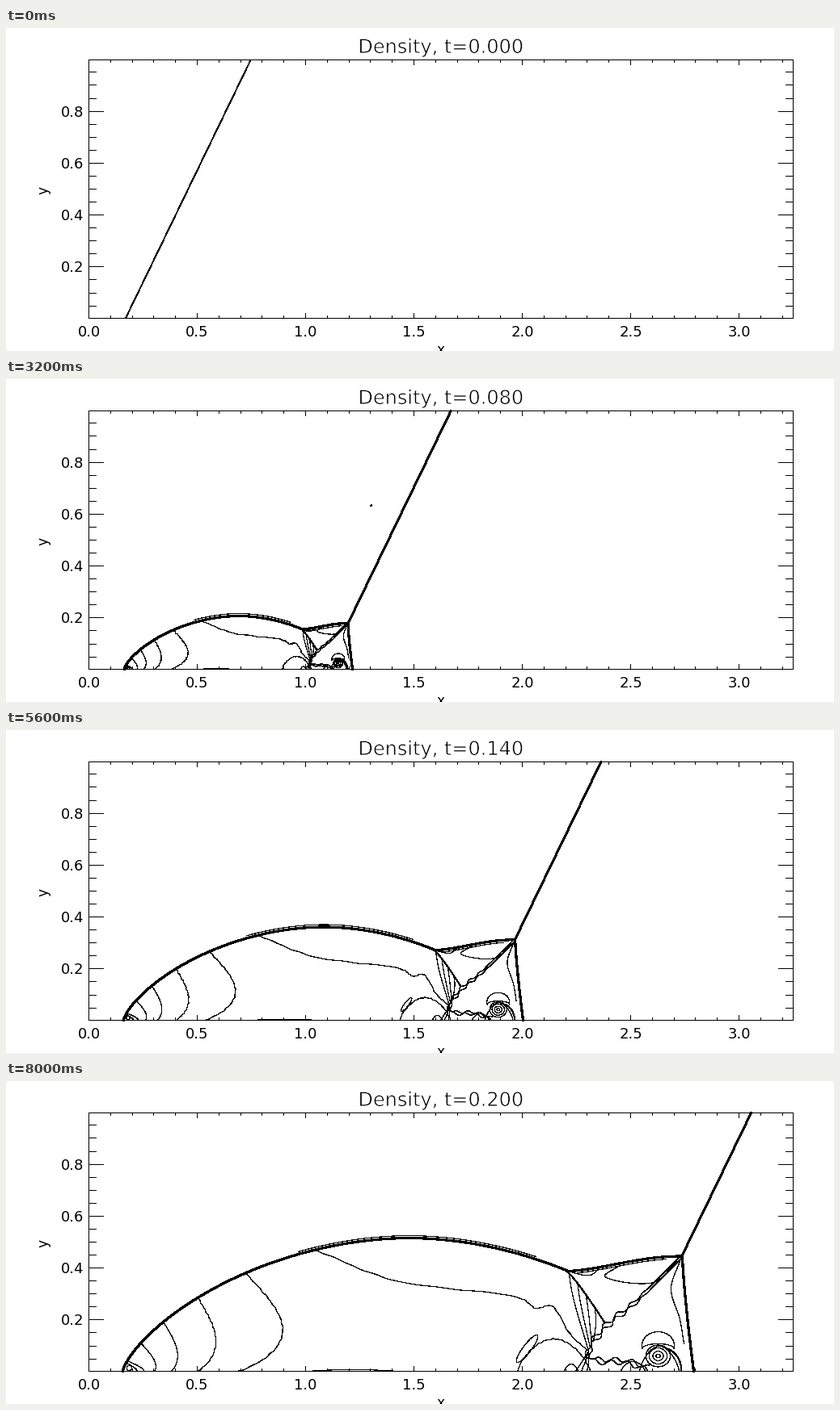
Write a matplotlib script that moves like this. It is 1024 by 400 pixels and loops after 8.4 s.

```python
import numpy as np
import matplotlib.pyplot as plt
import matplotlib.patheffects as effects
from matplotlib.animation import FuncAnimation

plt.rcParams["path.simplify"] = False
plt.rcParams["font.family"] = "DejaVu Sans"
W, H, DPI = 1024, 400, 100
PX = 72 / DPI                       # points per pixel
LEFT, RIGHT, TOP, WALL = 102, 973, 39, 359
UNIT = 268                          # pixels per unit of x
CELL = 1 / 240                      # the y axis runs between cell centres
FOOT = np.array([146.7, WALL])      # the flow grows from this point
NODE = np.array([720, 334])         # where the inner contours meet
STEPS = 21
GAP = [[np.nan, np.nan]]
V = np.linspace(0, 1, 90)

fig = plt.figure(figsize=(W / DPI, H / DPI), dpi=DPI, facecolor="white")
ax = fig.add_axes([0, 0, 1, 1])
ax.set_xlim(-0.5, W - 0.5)
ax.set_ylim(H - 0.5, -0.5)
ax.axis("off")


def pen(width):
    line, = ax.plot([], [], color="black", lw=width * PX, antialiased=False,
                    solid_capstyle="round", solid_joinstyle="round",
                    snap=False)
    return line


def draw(line, paths):
    parts = [part for path in paths for part in (path, GAP)]
    line.set_data(*np.vstack(parts or [GAP]).T)


def label(x, y, text, size=18, **kw):
    kw = {"ha": "center", "va": "baseline", **kw}
    return ax.text(x, y, text, fontsize=size * PX, **kw)


# ---- axes -------------------------------------------------------------

rules = [[(LEFT, TOP), (RIGHT, TOP), (RIGHT, WALL), (LEFT, WALL), (LEFT, TOP)]]
for i in range(33):
    x = round(LEFT + i * UNIT / 10)
    size = 3 if i % 5 else 6
    rules += [[(x, WALL), (x, WALL - size)], [(x, TOP), (x, TOP + size)]]
    if i % 5 == 0:
        label(x, 382, f"{i / 10:.1f}")
for i in range(1, 20):
    y = round(WALL - (i / 20 - CELL / 2) / (1 - CELL) * (WALL - TOP))
    size = 9 if i % 4 else 18
    rules += [[(LEFT, y), (LEFT + size, y)], [(RIGHT, y), (RIGHT - size, y)]]
    if i % 4 == 0:
        label(96, y + 6, f"{i / 20:.1f}", ha="right")
draw(pen(0.8), rules)

label(537, 403, "x", 17)
label(46, 201, "y", 17, va="center", rotation=90)
title = label(537.5, 30.5, "", 24)
title.set_path_effects([effects.Stroke(linewidth=0.5, foreground="white")])


# ---- curve helpers ----------------------------------------------------

def spline(*pts, n=20):
    """Smooth curve through a few points."""
    p = np.array(pts, float)
    u = np.r_[0, np.cumsum(np.sqrt(np.hypot(*np.diff(p, axis=0).T)))]
    m = np.gradient(p, u, axis=0)
    t = np.linspace(0, 1, n, endpoint=False)[:, None]
    out = []
    for k, h in enumerate(np.diff(u)):
        out.append((2 * t**3 - 3 * t**2 + 1) * p[k]
                   + (t**3 - 2 * t**2 + t) * h * m[k]
                   + (3 * t**2 - 2 * t**3) * p[k + 1]
                   + (t**3 - t**2) * h * m[k + 1])
    return np.vstack(out + [p[-1:]])


def arc(cx, cy, rx, ry, a=0, b=360):
    q = np.radians(np.linspace(a, b, 40))
    return np.c_[cx + rx * np.cos(q), cy - ry * np.sin(q)]


def hill(x0, x1, height):
    return np.c_[x0 + (x1 - x0) * V, WALL - height * np.sin(np.pi * V)**0.7]


def shift(p, d):
    """Move a curve sideways by d pixels."""
    g = np.gradient(p, axis=0)
    n = np.c_[-g[:, 1], g[:, 0]] / (np.hypot(*g.T)[:, None] + 1e-9)
    return p + n * np.reshape(d, (-1, 1))


def roughen(p, phase):
    k = np.arange(len(p))
    return shift(p, 0.6 * np.sin(0.9 * k) * np.sin(0.23 * k + phase))


# ---- flow, placed as it stands at t = 0.2 -----------------------------

def bow_height(x):
    r = np.clip(np.abs(x - 498) / 354, 0, 1)
    return 165 * (1 - r**1.9)**0.72


def fan_arc(k):
    """Contour k, from its foot on the wall up to the bow shock."""
    foot = 138 * 0.64**k
    top = foot * max(1.08 - 0.06 * k * k, 0.1)
    bulge = foot * (0.15 + 0.23 * 0.5**k)
    x = foot + (top - foot) * V + bulge * np.sin(np.pi * V**0.75)
    return np.c_[FOOT[0] + x, WALL - V * bow_height(FOOT[0] + top)]


bow_x = 144 + 549 * V**1.6
bow = np.c_[bow_x, WALL - bow_height(bow_x)]
roof = np.c_[693 + 142 * V, 235 - 18.5 * np.sin(np.pi / 2 * V)**1.6]
stem = np.c_[836 + 14 * V**1.3, 217 + 142 * V]
branch = np.c_[693 + 47 * V, 235 + 64 * V**1.15]
head = arc(811, WALL, 24, 29, 0, 75)
shear = spline((835, 217), (776, 275), (742, 303), NODE, (725, 344),
               (765, 347), (794, 356), n=50)

rough = [fan_arc(0), fan_arc(1), hill(632, 722, 40),
         spline((383, 209), (478, 246), (637, 269), (655, 281), (674, 278),
                (698, 314), NODE)]
fine = [fan_arc(k) for k in range(2, 6)] + [arc(152, 355, 3, 3)]
fine += [hill(690, 707, 9), hill(375, 482, 2), hill(760, 790, 12)]

# ribs fall from the branch to the node, others run on to the wall
for k in range(4):
    x, y = branch[20 * k + 5]
    fine.append(spline((x, y), (x + 5 - k, y + 0.3 * (NODE[1] - y)),
                       NODE + (2 * k, -4 * k)))
for k in range(3):
    fine.append(spline((704 + 7 * k, WALL), (712 + 4 * k, 347), NODE))

# cells between the shocks
fine += [spline((757, 229), (740, 241), (800, 249), (829, 223)),
         spline((700, 237), (722, 240), (735, 230)),
         spline((833, 222), (822, 257), (833, 295), (838, 325))]

# vortex on the wall with its cap
fine += [arc(806, 340, r, 0.9 * r) for r in (2.5, 6.5, 11, 15)]
fine += [hill(783, 832, 31), arc(806, 327, 20, 17, -15, 195),
         arc(806, 331, 20, 6, 0, 180)]

tilt = np.radians(53)
ex, ey = arc(0, 0, 21, 5).T
blob = np.c_[ex * np.cos(tilt) + ey * np.sin(tilt),
             ey * np.cos(tilt) - ex * np.sin(tilt)]

rng = np.random.default_rng(4)
SPECKS = np.linspace(325, 99, 13) + rng.uniform(-4, 4, 13)
SLOPE = UNIT / (WALL - TOP) / np.sqrt(3)
SPEED = UNIT * 20 / np.sqrt(3)
LAG = 525


def shock_x(y, t):
    return FOOT[0] + 0.7 + SLOPE * (WALL - y) + SPEED * t


def startup_wave(n, t):
    """Traces that fall behind the shock and die out early on."""
    if n > 8:
        return []
    step = 2**max(0, n - 4)
    half = max(1.2, 2 * (0.04 / t)**1.5)
    out = []
    for y in SPECKS[9 % step::step]:
        p = arc(0, min(y, WALL - 30), 0.8, half)
        p[:, 0] += shock_x(p[:, 1], t) - LAG * t
        out.append(p)
    if n <= 5:
        low = TOP + 1200 * t
        tip = shock_x(low, t) - LAG * t
        end = shock_x(TOP, t) - 3
        out.append([(end - 4, TOP + 1), (tip, low - 2), (tip + 4, low - 1),
                    (end, TOP + 3)])
    return out


thin, double, mid = pen(0.15), pen(0.4), pen(1)
thick, front = pen(2.2), pen(1.8)
lines = (thin, double, mid, thick, front)


def update(n):
    t = n / 100
    s = t / 0.2

    def grow(p):
        return FOOT + s * (p - FOOT)

    title.set_text(f"Density, t={t:.3f}")
    base = WALL - s * 142
    front.set_linewidth((0.8 if n == 0 else 2.6 if n < 6 else 1.8) * PX)
    draw(front, [[(shock_x(y, t), y) for y in (base, TOP)]])
    if n == 0:
        for line in lines[:-1]:
            draw(line, [])
        return lines + (title,)

    draw(thick, [grow(bow), grow(roof), grow(stem)])
    draw(mid, [grow(branch), grow(head)])

    # the shear layer rolls up more and more
    u = np.r_[0, np.cumsum(np.hypot(*np.diff(shear, axis=0).T))]
    u /= u[-1]
    swing = 3 * s**2 * np.clip(4 * u - 0.8, 0, 1)
    draw(double, [shift(grow(shear), side * (0.6 + 0.9 * s)
                        + swing * np.sin(75 * u + 0.8 * side))
                  for side in (-1, 1)])

    paths = [grow(p) for p in fine] + [roughen(grow(p), n) for p in rough]
    if s > 0.35:
        paths += [shift(grow(bow[50:-4]), -3), shift(grow(roof[8:-12]), 3)]
    size = np.clip((s - 0.5) / 0.28, 0, 1)
    if size > 0:
        paths.append(grow(np.array([644, 331]) + size * blob))
    draw(thin, paths + startup_wave(n, t))
    return lines + (title,)


anim = FuncAnimation(fig, update, frames=STEPS, interval=400, repeat=True,
                     repeat_delay=0, blit=False)
plt.show()
```
